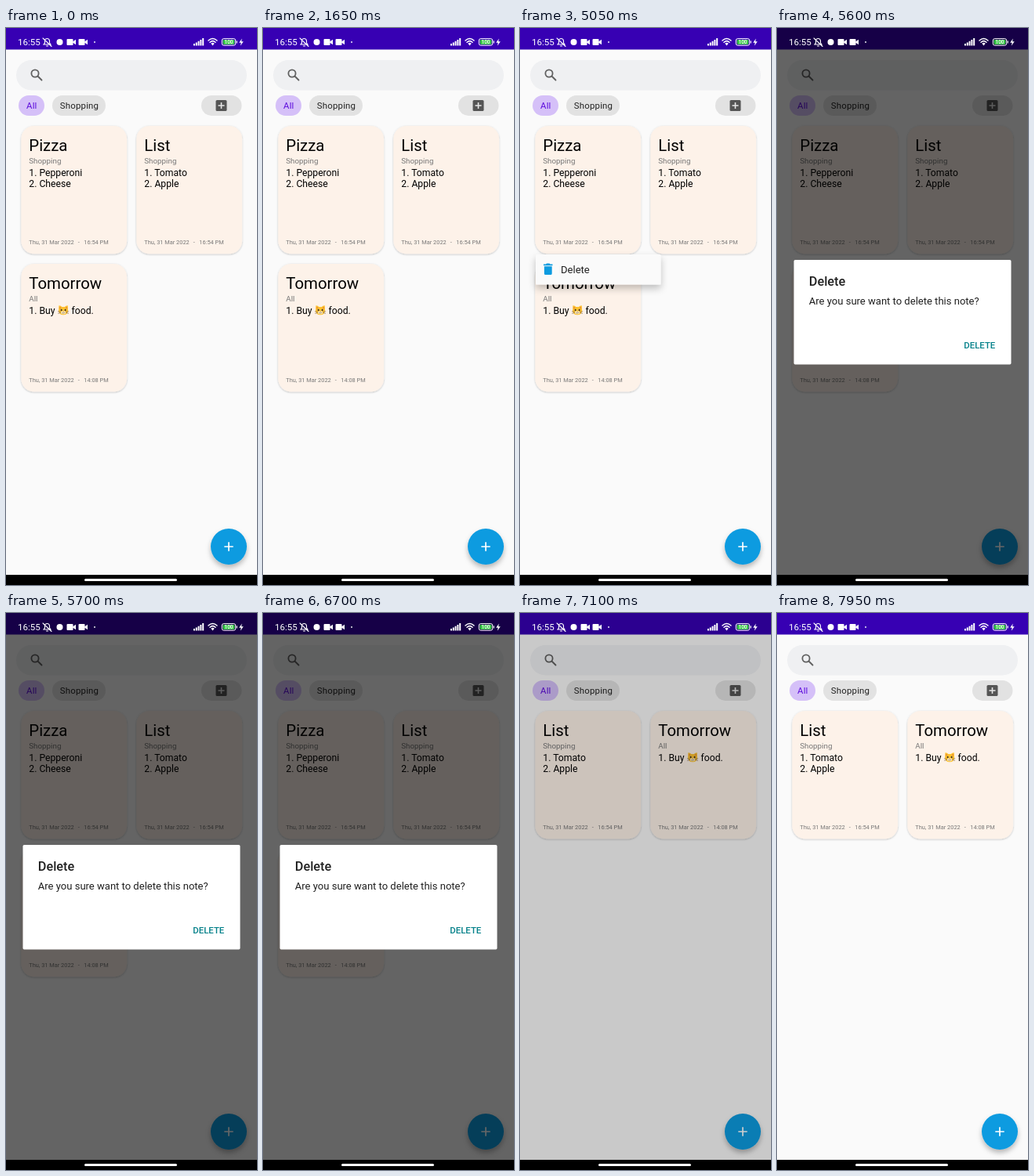
Write an HTML page that moves like this. It is 320 px wide and 711 px high and loops after 8000 ms.

```html
<!DOCTYPE html>
<html lang="en">
<head>
<meta charset="utf-8">
<title>Notes</title>
<style>
  html, body { margin: 0; width: 100%; height: 100%; overflow: hidden; background: #fafafa; }
  svg { display: block; width: 100vw; height: 100vh; font-family: Roboto, sans-serif; }
  .title { font-size: 20.4px; }
  .small { font-size: 9.8px; fill: #777; }
  .line { font-size: 12.2px; }
  .date { font-size: 7.4px; fill: #777; }
  .chip { font-size: 11.4px; letter-spacing: .018em; }
  .menu { font-size: 13.04px; fill: #212121; }
  .medium { font-weight: 500; }
  .stroke { fill: none; stroke-linecap: round; }
</style>
</head>
<body>
<svg viewBox="0 0 320 711">
  <defs>
    <filter id="cardShadow" x="-10%" y="-10%" width="120%" height="120%">
      <feDropShadow dx="0" dy=".8" stdDeviation=".8" flood-opacity=".25"/>
    </filter>
    <filter id="fabShadow" x="-40%" y="-40%" width="180%" height="190%">
      <feDropShadow dx="0" dy="4" stdDeviation="3" flood-opacity=".27"/>
    </filter>
    <filter id="menuShadow" x="-15%" y="-50%" width="130%" height="230%">
      <feDropShadow dx="0" dy="5" stdDeviation="5" flood-opacity=".24"/>
    </filter>
    <g id="camera" fill="#fff">
      <rect width="8" height="8" rx="1"/>
      <path d="M7.5 3.5 11.5 .8V7.2L7.5 4.5Z"/>
    </g>
    <g id="cat">
      <path d="M-5.7-6 Q-2.8-5.7-1.8-4.2H1.8Q2.8-5.7 5.7-6L6 1Q5.3 6 0 6T-6 1Z" fill="#fcc22f"/>
      <path d="M-4.8-4.6-2.6-3.4-4.6-1.5ZM4.8-4.6 2.6-3.4 4.6-1.5Z" fill="#e8833a"/>
      <ellipse cy="3" rx="3.1" ry="2" fill="#fff0c4"/>
      <ellipse cx="-2.5" cy="-.3" rx="1" ry="1.2" fill="#403229"/>
      <ellipse cx="2.5" cy="-.3" rx="1" ry="1.2" fill="#403229"/>
      <path d="M-1 1.5H1L0 2.5Z" fill="#8a4c3a"/>
      <path class="stroke" d="M-1.8 3.5Q0 4.6 1.8 3.2M-3.8 2-6.7 1.5M-3.8 3.3-6.5 4M3.8 2 6.7 1.5M3.8 3.3 6.5 4" stroke="#75573a" stroke-width=".6"/>
    </g>
  </defs>

  <rect width="320" height="711" fill="#fafafa"/>
  <rect width="320" height="27.5" fill="#3700b3"/>

  <!-- Search and categories -->
  <rect x="13" y="41" width="294" height="38.5" rx="19.2" fill="#eff0f2"/>
  <g class="stroke" stroke="#606060" stroke-width="1.8">
    <circle cx="37" cy="58" r="4.6"/>
    <path d="M40.5 61.5 45.5 66.5"/>
  </g>
  <rect x="16" y="86" width="33" height="26" rx="13" fill="#d5c0f8"/>
  <text class="chip" x="26" y="103" fill="#5b08dc">All</text>
  <rect x="59" y="86" width="68" height="26" rx="13" fill="#e2e2e2"/>
  <text class="chip" x="68.8" y="103" fill="#222">Shopping</text>
  <rect x="249" y="86" width="51.5" height="26" rx="13" fill="#e2e2e2"/>
  <rect x="267.5" y="92" width="14" height="14" rx="1.6" fill="#555"/>
  <path d="M270.5 99H278.5M274.5 95V103" stroke="#e6e6e6" stroke-width="1.6"/>

  <g id="cards"></g>

  <circle cx="284" cy="662" r="23" fill="#0c9be0" filter="url(#fabShadow)"/>
  <path d="M278.3 662H289.7M284 656.3V667.7" stroke="#fff" stroke-width="1.7"/>

  <g id="menu">
    <rect x="20" y="289" width="159.5" height="38.5" rx="1.6" fill="#fafafa" filter="url(#menuShadow)"/>
    <path d="M30 301.6H33L34 300.6H37.5L38.5 301.6H41.5V303.2H30ZM30.9 304.3H40.7V313.4Q40.7 315 39.1 315H32.5Q30.9 315 30.9 313.4Z" fill="#0c9be0"/>
    <text class="menu" x="52" y="313">Delete</text>
  </g>

  <rect id="dim" width="320" height="698"/>

  <g id="dialog">
    <rect x="21.5" y="296" width="277" height="133.5" rx="1.7" fill="#fff"/>
    <text class="medium" x="40.8" y="328.7" font-size="16.3" fill="#212121">Delete</text>
    <text class="menu" x="40.8" y="353.3">Are you sure want to delete this note?</text>
    <text class="medium" x="238.3" y="409" font-size="11.4" fill="#04818a">DELETE</text>
  </g>

  <!-- System icons -->
  <g fill="#fff">
    <text x="15" y="22" font-size="11.6">16:55</text>
    <g class="stroke" stroke="#fff" stroke-width="1.1">
      <path d="M48 21H57L55.5 19V16.5Q55.3 13.5 52.5 13.5T49.5 16.5V19ZM51.5 23H53.5M47 13 58 23.5"/>
      <path d="M258 16Q263.5 11 269 16M260 18.2Q263.5 15 267 18.2" stroke-width="1.5"/>
    </g>
    <circle cx="68.5" cy="18" r="4"/>
    <use href="#camera" x="77.5" y="14"/>
    <use href="#camera" x="92.5" y="14"/>
    <circle cx="113" cy="18" r=".9"/>
    <path d="M239 20h2v2.5h-2ZM241.8 18.5h2v4h-2ZM244.6 16.8h2v5.7h-2ZM247.4 15h2v7.5h-2ZM250.2 13h2v9.5h-2Z"/>
    <path d="M261.3 19.7Q263.5 18 265.7 19.7L263.5 22.5Z"/>
    <rect x="275.3" y="13.6" width="17.4" height="8.6" rx="2.4" fill="none" stroke="#fff"/>
    <rect x="276.6" y="14.9" width="14.8" height="6" rx="1.4" fill="#3cc84b"/>
    <rect x="293.6" y="16.3" width="1.2" height="3.2" rx=".5"/>
    <text class="medium" x="284" y="20.3" font-size="6.4" text-anchor="middle">100</text>
    <path d="M300.8 13.5 297.2 18.7H299.7L298.8 22.8 302.7 17.2H300.1Z"/>
  </g>
  <rect y="698" width="320" height="13"/>
  <rect x="100" y="703" width="118" height="3" rx="1.5" fill="#fff"/>
</svg>

<script>
const LOOP = 8000;
const MENU_OPEN = 4550, DIALOG_OPEN = 5350, DIALOG_CLOSE = 6900;

const byId = id => document.getElementById(id);
const clamp = v => Math.min(1, Math.max(0, v));
const ramp = (t, start, length) => clamp((t - start) / length);
const easeOut = p => 1 - (1 - p) ** 2;
const label = (cls, x, y, text) => `<text class="${cls}" x="${x}" y="${y}">${text}</text>`;

const slots = [[19.3, 125], [166.3, 125], [19.3, 301]];
const notes = [
  { title: "Pizza", group: "Shopping", lines: ["1. Pepperoni", "2. Cheese"], time: "16:54 PM" },
  { title: "List", group: "Shopping", lines: ["1. Tomato", "2. Apple"], time: "16:54 PM" },
  { title: "Tomorrow", group: "All", lines: ["1. Buy"], time: "14:08 PM",
    extra: '<use href="#cat" x="53.8" y="59.3"/>' + label("line", 64.2, 63.6, "food.") }
];

byId("cards").innerHTML = notes.map(note => `<g>
  <rect width="134.8" height="163.3" rx="16.5" fill="#fdf2e9" filter="url(#cardShadow)"/>
  ${label("title", 10, 31.8, note.title)}
  ${label("small", 10, 48, note.group)}
  ${note.lines.map((text, i) => label("line", 10, 63.6 + i * 14.3, text)).join("")}
  ${note.extra || ""}
  ${label("date", 10, 151.4, "Thu, 31 Mar 2022")}
  ${label("date", 72.4, 151.4, "-")}
  ${label("date", 80, 151.4, note.time)}
</g>`).join("");
const cards = [...byId("cards").children];

function setOpacity(id, value) {
  byId(id).setAttribute("opacity", value);
}

function scaleFrom(id, scale, x, y) {
  byId(id).setAttribute("transform", `translate(${x} ${y}) scale(${scale}) translate(${-x} ${-y})`);
}

function draw(t) {
  const deleted = t >= DIALOG_CLOSE;
  cards.forEach((card, i) => {
    const slot = slots[deleted ? Math.max(0, i - 1) : i];
    card.setAttribute("transform", `translate(${slot})`);
    card.setAttribute("visibility", deleted && i === 0 ? "hidden" : "visible");
  });

  const menuIn = easeOut(ramp(t, MENU_OPEN, 150));
  setOpacity("menu", menuIn * (1 - ramp(t, DIALOG_OPEN - 50, 100)));
  scaleFrom("menu", 0.85 + 0.15 * menuIn, 20, 289);

  const dialogIn = easeOut(ramp(t, DIALOG_OPEN, 150));
  const closing = ramp(t, DIALOG_CLOSE, 200);
  setOpacity("dialog", dialogIn * (1 - closing) ** 1.4);
  scaleFrom("dialog", 0.9 + 0.1 * dialogIn, 160, 363);
  setOpacity("dim", 0.6 * ramp(t, DIALOG_OPEN, 200) * (1 - ramp(t, DIALOG_CLOSE, 300)));
}

function tick() {
  draw(performance.now() % LOOP);
  requestAnimationFrame(tick);
}
tick();
</script>
</body>
</html>
```
